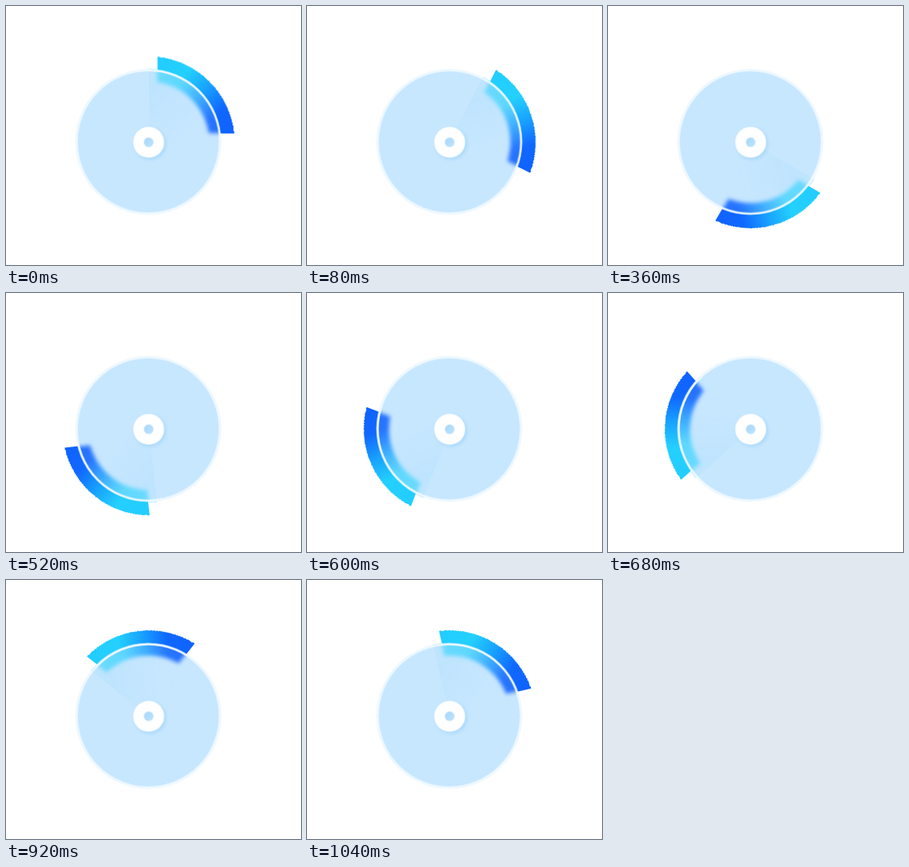
These frames come from a looping animation (369 by 324 pixels, 1.08 s). An HTML page:

```html
<!DOCTYPE html>
<html lang="en">
<head>
<meta charset="utf-8">
<title>Disc loader</title>
<style>
  html, body {
    margin: 0;
    width: 100%;
    height: 100%;
    overflow: hidden;
    background: #fff;
  }
  svg {
    display: block;
    width: 369px;
    height: 324px;
  }
  .spin {
    transform-origin: 0 0;
    animation: spin 1080ms -2ms infinite;
  }
  /* 27 poses of 40 ms each */
  @keyframes spin {
    0% { transform: rotate(0deg); animation-timing-function: steps(13); }
    48.1481% { transform: rotate(173.5deg); animation-timing-function: steps(4); }
    62.963% { transform: rotate(228.2deg); animation-timing-function: steps(6); }
    85.1852% { transform: rotate(308.2deg); animation-timing-function: steps(3); }
    96.2963% { transform: rotate(347deg); animation-timing-function: steps(1); }
    100% { transform: rotate(360deg); }
  }
  .soft { filter: blur(2.6px); }
  .rim { filter: blur(0.5px); }
  .hub { filter: drop-shadow(2px 2px 2px rgba(90, 180, 240, .3)); }
</style>
</head>
<body>
<svg viewBox="0 0 369 324">
  <defs>
    <linearGradient id="sweep" gradientUnits="userSpaceOnUse" x1="10" y1="-107" x2="107" y2="-11">
      <stop offset="0" stop-color="#22cdff"/>
      <stop offset=".3" stop-color="#24d0ff"/>
      <stop offset=".52" stop-color="#18a4ff"/>
      <stop offset=".76" stop-color="#1068ff"/>
      <stop offset="1" stop-color="#0f62ff"/>
    </linearGradient>
    <linearGradient id="frosted" gradientUnits="userSpaceOnUse" x1="10" y1="-90" x2="90" y2="-11">
      <stop offset="0" stop-color="#4cd6ff" stop-opacity=".72"/>
      <stop offset=".3" stop-color="#45d4ff" stop-opacity=".8"/>
      <stop offset=".55" stop-color="#2ca6ff" stop-opacity=".88"/>
      <stop offset=".8" stop-color="#1a6cff" stop-opacity=".93"/>
      <stop offset="1" stop-color="#1a66ff" stop-opacity=".93"/>
    </linearGradient>
    <linearGradient id="tint" gradientUnits="userSpaceOnUse" x1="0" y1="-60" x2="60" y2="0">
      <stop offset="0" stop-color="#a8dcf8" stop-opacity=".28"/>
      <stop offset="1" stop-color="#c7e7ff" stop-opacity="0"/>
    </linearGradient>
    <linearGradient id="hole" x1="0" y1="0" x2="1" y2="1">
      <stop offset="0" stop-color="#a6d8f8"/>
      <stop offset="1" stop-color="#bfe4ff"/>
    </linearGradient>
    <clipPath id="inside"><circle r="89"/></clipPath>
    <path id="band" d="M10.5-107 A107.5 107.5 0 0 1 106.9-11.5 H75.1 A76 76 0 0 0 10.5-75.3Z"/>
  </defs>

  <g transform="translate(178.5 170.5)">
    <g class="spin">
      <use href="#band" fill="url(#sweep)" shape-rendering="crispEdges"/>
    </g>

    <g transform="translate(-.5 -.5)">
      <circle r="91" fill="#e6f4ff" class="rim"/>
      <circle r="88.5" fill="#c7e7ff"/>
    </g>

    <g clip-path="url(#inside)">
      <g class="spin">
        <path d="M0 0V-90A90 90 0 0 1 90 0Z" fill="url(#tint)"/>
        <use href="#band" fill="url(#frosted)" class="soft"/>
      </g>
    </g>

    <g class="spin">
      <path d="M0-91.3A91.3 91.3 0 0 1 10.5-90.7" fill="none" stroke="#8fdcff" stroke-width="1.3" opacity=".5"/>
    </g>
    <circle cx="-.5" cy="-.5" r="89.6" fill="none" stroke="#f0f9ff" stroke-width="2.4" opacity=".85" class="rim"/>

    <circle r="19.3" fill="#fff" class="hub"/>
    <circle r="6" fill="url(#hole)"/>
  </g>
</svg>
</body>
</html>
```
